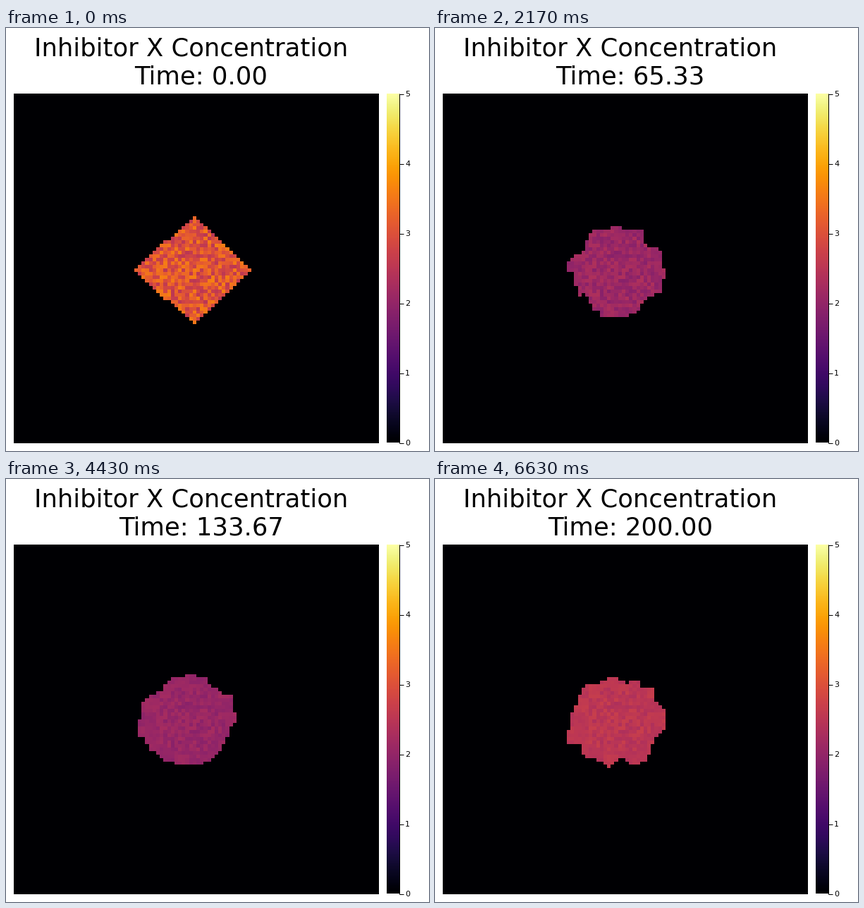
A matplotlib script for the animation above (6660 ms loop, 600 by 600 pixels).

```python
import numpy as np
import matplotlib.pyplot as plt
from matplotlib.animation import FuncAnimation

SIZE, DPI = 600, 100
FRAMES, LOOP_MS, END_TIME = 200, 6660, 200
N = 100
LEFT, RIGHT, TOP, BOTTOM = 11, 529, 93, 589
VMAX, TICK_STEP = 5, 99

rng = np.random.default_rng(7)
plt.rcParams["font.family"] = "DejaVu Sans"

# Cell centres in stage pixels
xs = LEFT + (np.arange(N) + 0.5) * (RIGHT - LEFT) / N
ys = TOP + (np.arange(N) + 0.5) * (BOTTOM - TOP) / N
X, Y = np.meshgrid(xs, ys)

# Fine grain in the core, copied patches near the rim
fine = rng.uniform(-1, 1, (N, N))
patches = np.kron(rng.uniform(-1, 1, (N // 4, N // 4)), np.ones((4, 4)))
coarse = 0.6 * patches + 0.3 * fine
radius = np.hypot(X - 260, Y - 344) + 6 * rng.uniform(-1, 1, (N, N))

WAVES = 14
angle = rng.uniform(0, 2 * np.pi, WAVES)
freq = 2 * np.pi / rng.uniform(22, 55, WAVES)
speed = 2 * np.pi / rng.uniform(12, 50, WAVES)
phase = rng.uniform(0, 2 * np.pi, WAVES)


def ripple(k):
    """Smooth restless field that jostles the rim."""
    waves = (np.sin(f * (X * np.cos(a) + Y * np.sin(a)) + s * k + p)
             for a, f, s, p in zip(angle, freq, speed, phase))
    return sum(waves) / np.sqrt(WAVES / 2)


def tissue(k):
    """Diamond that relaxes into a disc of about the same area."""
    u = k / (FRAMES - 1)
    settle = 1 - np.exp(-k / 25)
    power = 1 + u ** 0.65
    dx = np.abs(X - 266.3 + 8 * settle) / (83.5 - 15 * settle)
    dy = np.abs(Y - 343.5 - settle) / (77 - 8 * settle - 8 * u)
    rho = (dx ** power + dy ** power) ** (1 / power)
    return 66 * (1 - rho) + 3.5 * settle * ripple(k) > 0


def field(k):
    mean = 2.06 + 0.99 * np.exp(-k / 21) + 0.45 * np.exp((k - FRAMES + 1) / 9)
    span = 0.17 + 0.38 * np.exp(-k / 40)
    core = 44 + 50 * np.exp(-k / 45)
    grain = np.where(radius < core, fine, coarse)
    return np.where(tissue(k), mean + span * grain, 0)


fig = plt.figure(figsize=(SIZE / DPI, SIZE / DPI), dpi=DPI, facecolor="white")
ax = fig.add_axes([0, 0, 1, 1])
ax.axis("off")

style = dict(cmap="inferno", interpolation="nearest", aspect="auto")
heat = ax.imshow(field(0), vmin=0, vmax=VMAX,
                 extent=(LEFT, RIGHT, BOTTOM, TOP), **style)
ax.imshow(np.linspace(1, 0, 256)[:, None],
          extent=(540, 558, BOTTOM - 1, TOP), **style)
ax.set_xlim(0, SIZE)
ax.set_ylim(SIZE, 0)

# Colour bar axis
line = dict(color="black", lw=72 / DPI, solid_capstyle="butt")
ax.plot([558, 558], [TOP, BOTTOM], **line)
for v in range(VMAX + 1):
    y = BOTTOM - v * TICK_STEP
    ax.plot([558, 564], [y, y], **line)
    ax.text(566, y + 3, str(v), fontsize=8, va="baseline")

title = dict(fontsize=25.5, va="baseline")
ax.text(40, 40, "Inhibitor X Concentration", **title)
clock = ax.text(277, 79, "", ha="center", **title)


def draw(k):
    heat.set_data(field(k))
    clock.set_text(f"Time: {END_TIME * k / (FRAMES - 1):.2f}")
    return heat, clock


anim = FuncAnimation(fig, draw, frames=FRAMES, interval=LOOP_MS / FRAMES,
                     repeat=True, repeat_delay=0)
plt.show()
```
